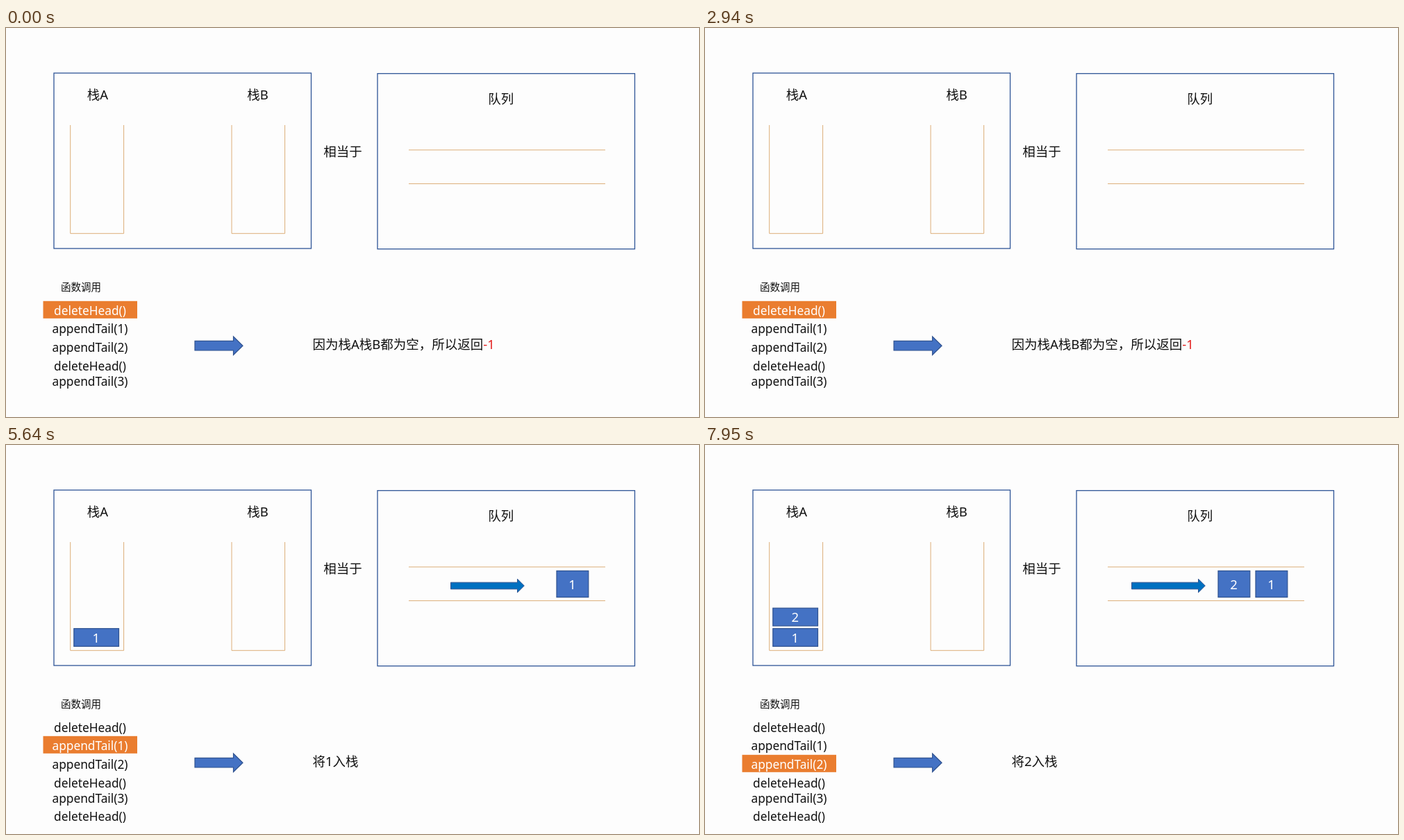
Write an HTML page that moves like this. It is 998x561 px and loops after 7.99 s.

```html
<!DOCTYPE html>
<html lang="zh-CN">
<head>
<meta charset="utf-8">
<style>
  html, body { margin: 0; width: 100%; height: 100%; overflow: hidden; background: #fdfdfd; }
  svg { display: block; width: 998px; height: 561px; }
  text { font: 18.5px "Noto Sans", "Noto Sans CJK SC", "Noto Sans CJK", sans-serif; fill: #111; }
  .mid { text-anchor: middle; }
  .call { font-size: 17.3px; text-anchor: middle; }
  .light { fill: #fff; }
  .panel { fill: none; stroke: #2f5597; stroke-width: 1.3; }
  .rail { fill: none; stroke: #dcae78; stroke-width: 1; }
  .block { fill: #4472c4; stroke: #2f528f; stroke-width: 1.2; }
  .flow { fill: #0070c0; stroke: #2f528f; stroke-width: 1; }
</style>
</head>
<body>
<svg viewBox="0 0 998 561">
  <rect class="panel" x="69" y="65" width="370.5" height="253"/>
  <rect class="panel" x="535" y="65.7" width="370.5" height="253"/>
  <path class="rail" d="M92.7 140V296.3H169.6V140M325 140V296.3H401.6V140M580 175.9H863M580 224.6H863"/>
  <text class="mid" x="132" y="103">栈A</text>
  <text class="mid" x="362.5" y="103">栈B</text>
  <text class="mid" x="485" y="184.5">相当于</text>
  <text class="mid" x="712.7" y="109">队列</text>
  <text class="mid" x="108" y="378.7" style="font-size:14.5px">函数调用</text>
  <path class="block" d="M272 451.3H327.5V445L341 458.2L327.5 471.5V465H272Z"/>
  <g id="scene"></g>
</svg>
<script>
const LOOP = 7990;
const STARTS = [0, 3100, 6000];
const CALLS = [
  ["deleteHead()", 407], ["appendTail(1)", 433], ["appendTail(2)", 460],
  ["deleteHead()", 487], ["appendTail(3)", 509.5], ["deleteHead()", 535.5]
];
const scene = document.getElementById("scene");

const label = (x, y, text, cls = "") => `<text class="${cls}" x="${x}" y="${y}">${text}</text>`;

const block = (x, y, w, h, text) =>
  `<rect class="block" x="${x}" y="${y}" width="${w}" height="${h}"/>` +
  label(x + w / 2 - 0.4, y + h / 2 + 7, text, "mid light");

function callList(step) {
  const visible = step ? CALLS : CALLS.slice(0, 5);
  const top = CALLS[step][1] - 13.2;
  return `<rect x="53.5" y="${top}" width="135.5" height="25" fill="#ea7d2f"/>` +
    visible.map(([name, y], i) =>
      label(121, y + 6.5, name, i === step ? "call light" : "call")).join("");
}

function draw(step) {
  let parts = callList(step);
  parts += step
    ? label(441.5, 463.3, `将${step}入栈`)
    : label(441.5, 463.3, '因为栈A栈B都为空，所以返回<tspan fill="#e3201f">-1</tspan>');
  for (let n = 1; n <= step; n++) {
    parts += block(97.8, 294.2 - 29.5 * n, 64.7, 25.7, n);
    parts += block(847 - 54 * n, 181.5, 45.8, 38, n);
  }
  if (step) {
    parts += `<path class="flow" transform="translate(${666.5 - 26 * step} 203)"
      d="M0 -4.8H96V-9.8L105.8 0L96 9.8V4.8H0Z"/>`;
  }
  scene.innerHTML = parts;
}

let shown = -1;
function tick() {
  const time = performance.now() % LOOP;
  const step = STARTS.filter(start => start <= time).length - 1;
  if (step !== shown) draw(shown = step);
  requestAnimationFrame(tick);
}
tick();
</script>
</body>
</html>
```
